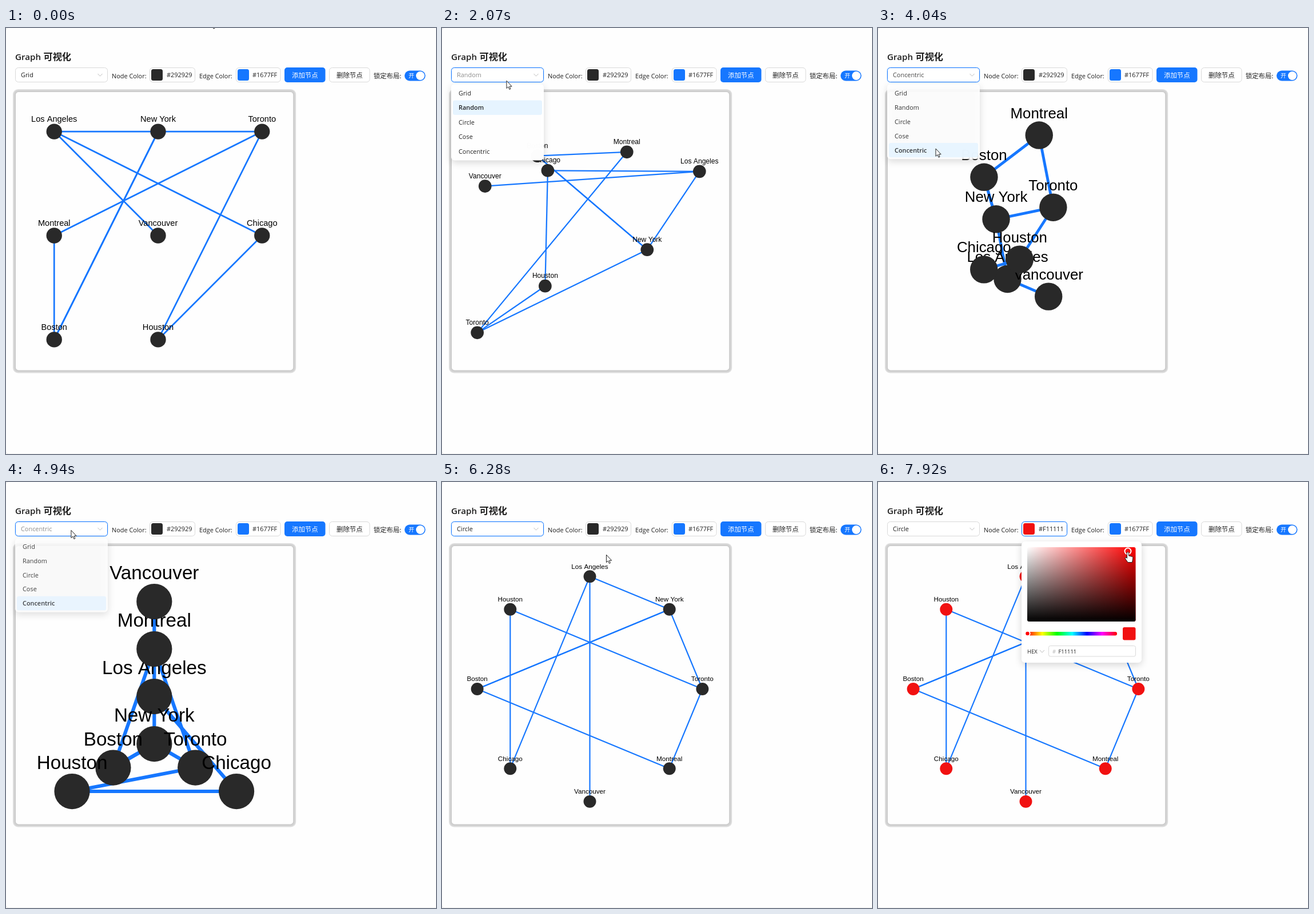
Animation, 752 px wide and 745 px high, one loop 8 s. Source, as an HTML page with a canvas:

```html
<!DOCTYPE html>
<html lang="zh">
<head>
<meta charset="utf-8">
<title>Graph</title>
<style>
html, body { margin: 0; width: 100%; height: 100%; overflow: hidden; background: #fefefe; }
canvas { display: block; }
</style>
</head>
<body>
<canvas id="stage" width="752" height="745"></canvas>
<script>
const ctx = document.getElementById('stage').getContext('2d');
const LOOP = 8000;
const BLUE = '#1677ff', LINE = '#d9d9d9', INK = 'rgba(0,0,0,0.88)';
const UI = '"Open Sans", "Noto Sans", sans-serif';
const CJK = '"Noto Sans CJK SC", "Noto Sans CJK", "Noto Sans CJK JP", sans-serif';
const LABEL = '"Liberation Sans", Arial, sans-serif';

const clamp = (v, a = 0, b = 1) => Math.min(b, Math.max(a, v));
const lerp = (a, b, u) => a + (b - a) * u;
const span = (t, start, length) => clamp((t - start) / length);
const smooth = u => u * u * (3 - 2 * u);
const lerpPt = (a, b, u) => [lerp(a[0], b[0], u), lerp(a[1], b[1], u)];
const polar = (r, turn) => [r * Math.sin(2 * Math.PI * turn), -r * Math.cos(2 * Math.PI * turn)];

// ---- graph ----
const cities = ['Los Angeles', 'New York', 'Toronto', 'Montreal', 'Vancouver', 'Chicago', 'Boston', 'Houston'];
const edges = ['01', '12', '04', '05', '23', '27', '57', '36', '16', '16'].map(pair => [...pair].map(Number));
const degree = cities.map((_, i) => edges.flat().filter(n => n === i).length);

// Each layout has a zoom z, a screen centre c and model points p.
const grid = {
  z: 0.912, c: [266, 363],
  p: cities.map((_, i) => [(i % 3 - 1) * 199.3, (Math.floor(i / 3) - 1) * 199.5])
};
const circle = { z: 0.731, c: [258.5, 362], p: cities.map((_, i) => polar(269.3, i / 8)) };

// One ring per degree, the best connected node in the middle.
const concentric = {
  z: 2.075, c: [259.3, 458],
  p: degree.map((d, i) => {
    const ring = degree.flatMap((other, k) => other === d ? [k] : []);
    return polar(40 * (Math.max(...degree) - d), ring.indexOf(i) / ring.length);
  })
};

// Free layouts: key poses only.
const random = {
  z: 0.756, c: [259, 362],
  p: [[253, -147], [132, 34], [-261, 226], [85, -192], [-243, -113], [-98, -149], [-122, -183], [-104, 118]]
};
const settling = {
  z: 1.633, c: [0, 0],
  p: [[264, 530], [216, 338], [323, 290], [248, 192], [368, 548], [136, 454], [137, 251], [352, 422]]
};
const cose = {
  z: 1.442, c: [571, 598],
  p: [[-221, -88], [-238, -192], [-166, -217], [-174, -287], [-160, -32], [-282, -132], [-243, -262], [-177, -147]]
};

const mix = (a, b, u) => ({
  z: lerp(a.z, b.z, u), c: lerpPt(a.c, b.c, u), p: a.p.map((q, i) => lerpPt(q, b.p[i], u))
});
const place = ({ z, c, p }) => ({ z, c: [0, 0], p: p.map(([x, y]) => [c[0] + x * z, c[1] + y * z]) });

// ---- timing ----
const options = ['Grid', 'Random', 'Circle', 'Cose', 'Concentric'];
const rounds = [
  { open: 900, pick: 1400, row: 1 },
  { open: 1960, pick: 2670, row: 3 },
  { open: 3520, pick: 3885, row: 4 },
  { open: 4880, pick: 5577, row: 2 }
];
const [toRandom, toCose, toConcentric, toCircle] = rounds.map(r => r.pick + 20);
const PICKER_FOCUS = 6720, PICKER_OPEN = 6860, DRAG = 7630;

function graphAt(t) {
  const shift = (from, to, start) => place(mix(from, to, span(t, start, 500)));
  if (t < toCose + 210) return shift(grid, random, toRandom);
  if (t < toConcentric) return mix(settling, place(cose), 1 - (1 - span(t, 2960, 440)) ** 2);
  if (t < toCircle) return shift(cose, concentric, toConcentric);
  return shift(concentric, circle, toCircle);
}

const rowY = i => 114 + i * 25.5;
const row = i => [101, rowY(i) - 5];
const SELECT = [114, 84], NODE_COLOR = [288, 84], GRAB = [431, 127], DROP = [437, 121];

// start, end, place the pointer goes to
const moves = [
  [70, 350, [428, 70]], [350, 800, SELECT], [920, 1250, row(1)],
  [1400, 1640, SELECT], [1980, 2500, row(3)],
  [2670, 3310, SELECT], [3540, 3830, row(4)],
  [4540, 4820, SELECT], [4920, 5390, row(2)],
  [5600, 5830, [287, 160]], [6000, 6620, NODE_COLOR],
  [6870, 6950, [287, 135]], [7000, 7490, GRAB], [DRAG, 7860, DROP]
];
const pointerAt = t => moves.reduce(
  (at, [start, end, to]) => lerpPt(at, to, smooth(span(t, start, end - start))), [358, -14]);

// 0 = hidden, 1 = fully open
function openness(t, opened, closed) {
  if (t < closed) return 1 - (1 - span(t, opened, 200)) ** 5;
  return 1 - span(t, closed, 200) ** 5;
}

function menuAt(t) {
  const round = rounds.filter(r => r.open <= t).pop();
  if (!round) return { open: 0, chosen: 0, ink: 0.88 };
  const last = rounds.filter(r => r.pick <= t).pop();
  return {
    open: openness(t, round.open, round.pick + 30),
    chosen: last ? last.row : 0,
    ink: lerp(0.45, 0.88, span(t, round.pick, 250))
  };
}

const SV = { x: 261, y: 114, w: 189.5, h: 130 };
function pickAt(t) {
  const at = t < DRAG ? [261, 223] : pointerAt(t);
  const s = (at[0] - SV.x) / SV.w, v = 255 * (1 - (at[1] - SV.y) / SV.h);
  const hex = [v, v * (1 - s), v * (1 - s)]
    .map(n => Math.round(n).toString(16).padStart(2, '0')).join('').toUpperCase();
  return { at, hex };
}

// ---- drawing helpers ----
function box(x, y, w, h, r, fill, stroke) {
  ctx.beginPath();
  ctx.roundRect(x, y, w, h, r);
  if (fill) { ctx.fillStyle = fill; ctx.fill(); }
  if (stroke) { ctx.strokeStyle = stroke; ctx.lineWidth = 1; ctx.stroke(); }
}
function text(s, x, y, size, color = INK, weight = 400, family = UI) {
  ctx.font = `${weight} ${size}px ${family}`;
  ctx.fillStyle = color;
  ctx.fillText(s, x, y);
}
function disc(x, y, r, fill, stroke) {
  ctx.beginPath();
  ctx.arc(x, y, r, 0, 7);
  if (fill) { ctx.fillStyle = fill; ctx.fill(); }
  if (stroke) { ctx.strokeStyle = stroke; ctx.lineWidth = 2; ctx.stroke(); }
}
function line(points, color, width) {
  ctx.beginPath();
  points.forEach(([x, y]) => ctx.lineTo(x, y));
  ctx.strokeStyle = color;
  ctx.lineWidth = width;
  ctx.stroke();
}
const chevron = (x, y) => line([[x - 4, y - 2], [x, y + 2.2], [x + 4, y - 2]], '#bdbdbd', 1);
function field(x, w, focus) {
  if (focus) box(x - 1, 68, w + 2, 28, 6, 'rgba(5,145,255,0.1)');
  box(x + 0.5, 69.5, w - 1, 25, 5, '#fff', focus ? BLUE : LINE);
}
function floating(x, y, w, h) {
  ctx.save();
  ctx.shadowColor = 'rgba(0,0,0,0.16)';
  ctx.shadowBlur = 13;
  ctx.shadowOffsetY = 4;
  box(x, y, w, h, 6, '#fff');
  ctx.restore();
}
function gradient(x0, y0, x1, y1, colors) {
  const g = ctx.createLinearGradient(x0, y0, x1, y1);
  colors.forEach((c, i) => g.addColorStop(i / (colors.length - 1), c));
  return g;
}
// Scales and fades what is drawn as a popup opens.
function popup(x, y, open, scaleX, paint) {
  if (open <= 0) return;
  const k = 0.8 + 0.2 * open;
  ctx.save();
  ctx.globalAlpha = open;
  ctx.translate(x, y);
  ctx.scale(scaleX ? k : 1, k);
  ctx.translate(-x, -y);
  paint();
  ctx.restore();
}

// ---- parts ----
function drawPage() {
  ctx.fillStyle = '#fefefe';
  ctx.fillRect(0, 0, 752, 745);
  box(-0.5, -0.5, 900, 745.5, 5, null, '#e4e4e4');
  text('Graph', 16, 55.5, 15.2, INK, 600);
  text('可视化', 65.5, 56, 16.2, INK, 700, CJK);
}

function drawToolbar(t, color, menu) {
  field(16, 162, t >= rounds[0].open && t < PICKER_FOCUS);
  text(options[menu.chosen], 26, 86, 10.9, `rgba(0,0,0,${menu.ink})`);
  if (menu.open > 0.5 && t % 1060 < 530) line([[26.5, 75], [26.5, 89]], INK, 1);
  chevron(164.5, 82);

  text('Node Color:', 185, 87.5, 10.9);
  field(251, 80, t >= PICKER_FOCUS);
  box(254, 72, 20, 20, 3.5, '#' + color);
  text('#' + color, 281, 86, 10.9);

  text('Edge Color:', 338, 87.5, 10.9);
  field(402, 78.5, false);
  box(405, 72, 20, 20, 3.5, BLUE);
  text('#1677FF', 431, 86, 10.9);

  box(487, 69, 71.5, 26, 5, BLUE);
  text('添加节点', 500, 86.8, 11.4, '#fff', 500, CJK);
  box(565.5, 69.5, 70.5, 25, 5, '#fff', LINE);
  text('删除节点', 578, 86.8, 11.4, INK, 400, CJK);
  text('锁定布局:', 643, 87.6, 11.3, INK, 400, CJK);
  box(697, 74.5, 36.5, 18, 9, BLUE);
  text('开', 704, 87.2, 10, '#fff', 500, CJK);
  disc(724.5, 83.5, 7.5, '#fff');
}

function drawGraph(t, color) {
  const frame = (inset, radius, fill) =>
    box(12 + inset, 107 + inset, 495.2 - 2 * inset, 496.5 - 2 * inset, radius, fill);
  frame(0, 9, '#e0e0e0');
  frame(1.5, 8, '#d2d2d2');
  frame(4, 6, '#c6c6c6');
  frame(5, 5, '#fefefe');
  ctx.save();
  ctx.clip();
  const { z, p } = graphAt(t);
  edges.forEach(([a, b]) => line([p[a], p[b]], BLUE, 3 * z));
  ctx.textAlign = 'center';
  ctx.textBaseline = 'bottom';
  p.forEach(([x, y], i) => {
    disc(x, y, 15 * z, '#' + color);
    text(cities[i], x, y - 15 * z, 16 * z, '#000', 400, LABEL);
  });
  ctx.restore();
}

function drawMenu({ open, chosen }) {
  popup(16, 98, open, false, () => {
    floating(16, 98, 162, 134);
    box(19, rowY(chosen) - 12.8, 156, 25.6, 3.5, '#e6f4ff');
    options.forEach((name, i) => text(name, 29, rowY(i) + 4, 10.9, INK, i === chosen ? 600 : 400));
  });
}

function drawPicker(t, { at, hex }) {
  popup(253, 104, openness(t, PICKER_OPEN, Infinity), true, () => {
    floating(251, 104, 210, 212);
    const { x, y, w, h } = SV;
    box(x, y, w, h, 3, gradient(x, 0, x + w, 0, ['#fff', '#f00']));
    box(x, y, w, h, 3, gradient(0, y, 0, y + h, ['rgba(0,0,0,0)', '#000']));
    disc(...at, 5.5, null, '#fff');

    const hues = Array.from({ length: 7 }, (_, i) => `hsl(${i * 60},100%,50%)`);
    box(x, 262, 157, 6.5, 3.2, gradient(x, 0, x + 157, 0, hues));
    disc(261.5, 265, 4.2, '#f00', '#fff');
    box(428, 254, 22.5, 22.5, 3, '#' + hex);

    text('HEX', x, 299.5, 9.4);
    chevron(287, 296);
    box(298.5, 286.5, 152, 18.5, 3, '#fff', LINE);
    text('#', 305, 299.5, 9.4, 'rgba(0,0,0,0.3)');
    text(hex, 315.5, 299.5, 9.4);
  });
}

const ARROW = new Path2D('M0 0V13.3L3 10.6L5 15.2L7 14.3L5.1 9.9H9.2Z');
const HAND = new Path2D('M-1.5 2.5Q0 .5 1.5 2.5V8L7.5 9.5Q9 10 8.8 12L7.5 19.5H0L-4.6 13Q-5 10.5-2.8 11L-1.5 12.5Z');
function drawPointer(t) {
  const shape = t < DRAG ? ARROW : HAND;
  ctx.save();
  ctx.translate(...pointerAt(t));
  ctx.lineJoin = 'round';
  ctx.lineWidth = 1;
  ctx.fillStyle = '#fff';
  ctx.strokeStyle = '#222';
  ctx.fill(shape);
  ctx.stroke(shape);
  ctx.restore();
}

function draw(t) {
  const pick = pickAt(t), menu = menuAt(t);
  drawPage();
  drawGraph(t, pick.hex);
  drawToolbar(t, pick.hex, menu);
  drawMenu(menu);
  drawPicker(t, pick);
  drawPointer(t);
}

const start = performance.now();
function tick() {
  draw((performance.now() - start) % LOOP);
  requestAnimationFrame(tick);
}
tick();
</script>
</body>
</html>
```
